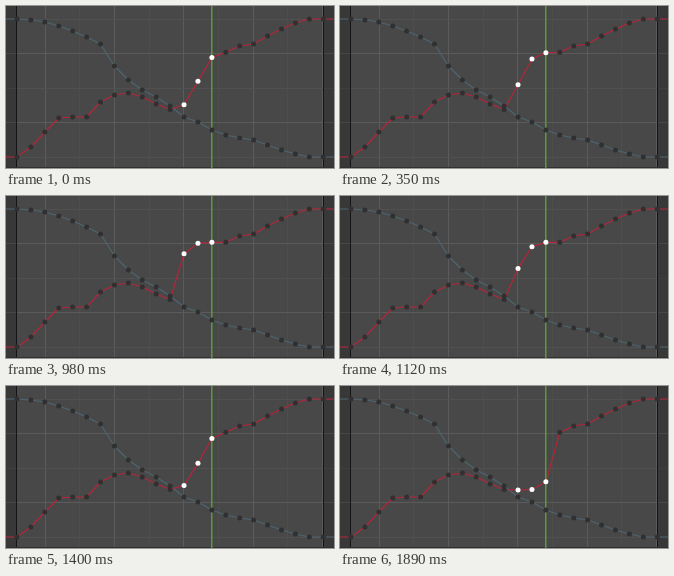
These frames come from a looping animation (328x162 px, 1.96 s). An HTML page with a canvas:

```html
<!DOCTYPE html>
<html>
<head>
<meta charset="utf-8">
<style>
html, body { margin: 0; width: 100%; height: 100%; overflow: hidden; background: #484848; }
canvas { display: block; }
</style>
</head>
<body>
<canvas id="graph" width="328" height="162"></canvas>
<script>
const ctx = document.getElementById('graph').getContext('2d');
const W = 328, H = 162, STEP = 70, LOOP = 1960;
const keyX = i => 11 + i * 13.92;

const blue = [13, 14, 16, 20, 25, 31, 38, 60, 74, 84, 91, 100, 111, 116, 124, 129, 132, 134, 139, 144, 148, 151, 151];
const red = [151, 141, 126, 112, 111, 111, 96, 89, 87, 91, 98, 103.5, 0, 0, 0, 46.3, 40, 38, 30, 23, 17, 13, 13];
const FIRST = 12, LAST = 14;

// [time, ease bias]
const bias = [
  [0, 0], [70, .4], [210, 1.23], [350, 1.95], [560, 2.85], [700, 3.7], [910, 3.7],
  [980, 3.56], [1050, 3.05], [1260, 1.05], [1610, -1.95], [1890, -3.93]
];

function biasAt(t) {
  let i = 0;
  while (i < bias.length - 2 && t > bias[i + 1][0]) i++;
  const [t0, a] = bias[i], [t1, b] = bias[i + 1];
  return a + (b - a) * (t - t0) / (t1 - t0);
}

// S-curve whose centre slides with the bias
function ease(x, shift) {
  const a = Math.exp(shift) * x * x, b = (1 - x) ** 2;
  return Math.min(1, Math.max(0, (a / (a + b) - .01) / .98));
}

function rect(color, x, y, w, h) {
  ctx.fillStyle = color;
  ctx.fillRect(x, y, w, h);
}

function drawGrid() {
  rect('#484848', 0, 0, W, H);
  for (let i = 0; i < 9; i++) rect(i % 2 ? '#4d4d4d' : '#5b5b5b', Math.round(38.5 + (i - 0) * 34.7), 0, 1, H);
  for (let i = 0; i < 5; i++) rect(i % 2 ? '#5b5b5b' : '#505050', 0, Math.round(12.5 + i * 34.6), W, 1);
  rect('rgba(0,0,0,.22)', 0, 0, 10, H);
  rect('rgba(0,0,0,.22)', 318, 0, 10, H);
  rect('#141414', 10, 0, 1, H);
  rect('#141414', 317, 0, 1, H);
  rect('#303030', 0, 161, W, 1);
}

function drawCurve(ys, color) {
  ctx.strokeStyle = color;
  ctx.lineWidth = 1.2;
  ctx.lineJoin = 'round';
  ctx.beginPath();
  ctx.moveTo(0, ys[0]);
  ys.forEach((y, i) => ctx.lineTo(keyX(i), y));
  ctx.lineTo(W, ys[ys.length - 1]);
  ctx.stroke();
}

function drawKeys(ys, color, from, to) {
  ctx.fillStyle = color;
  for (let i = from; i <= to; i++) {
    ctx.beginPath();
    ctx.arc(keyX(i), ys[i], 2.5, 0, Math.PI * 2);
    ctx.fill();
  }
}

function draw(t) {
  const shift = biasAt(t), ys = red.slice();
  for (let i = FIRST; i <= LAST; i++) {
    ys[i] = 104 + (46.3 - 104) * ease((i - FIRST + 1) / 4, shift);
  }
  drawGrid();
  drawCurve(blue, '#4c6570');
  drawCurve(ys, '#b4253a');
  rect('#5b9a35', 205, 0, 1.5, H);
  drawKeys(blue, '#303030', 0, 22);
  drawKeys(ys, '#303030', 0, FIRST - 1);
  drawKeys(ys, '#303030', LAST + 1, 22);
  drawKeys(ys, '#ffffff', FIRST, LAST);
}

const start = performance.now();
function tick() {
  const t = (performance.now() - start) % LOOP;
  draw(Math.floor(t / STEP) * STEP);
  requestAnimationFrame(tick);
}
tick();
</script>
</body>
</html>
```
